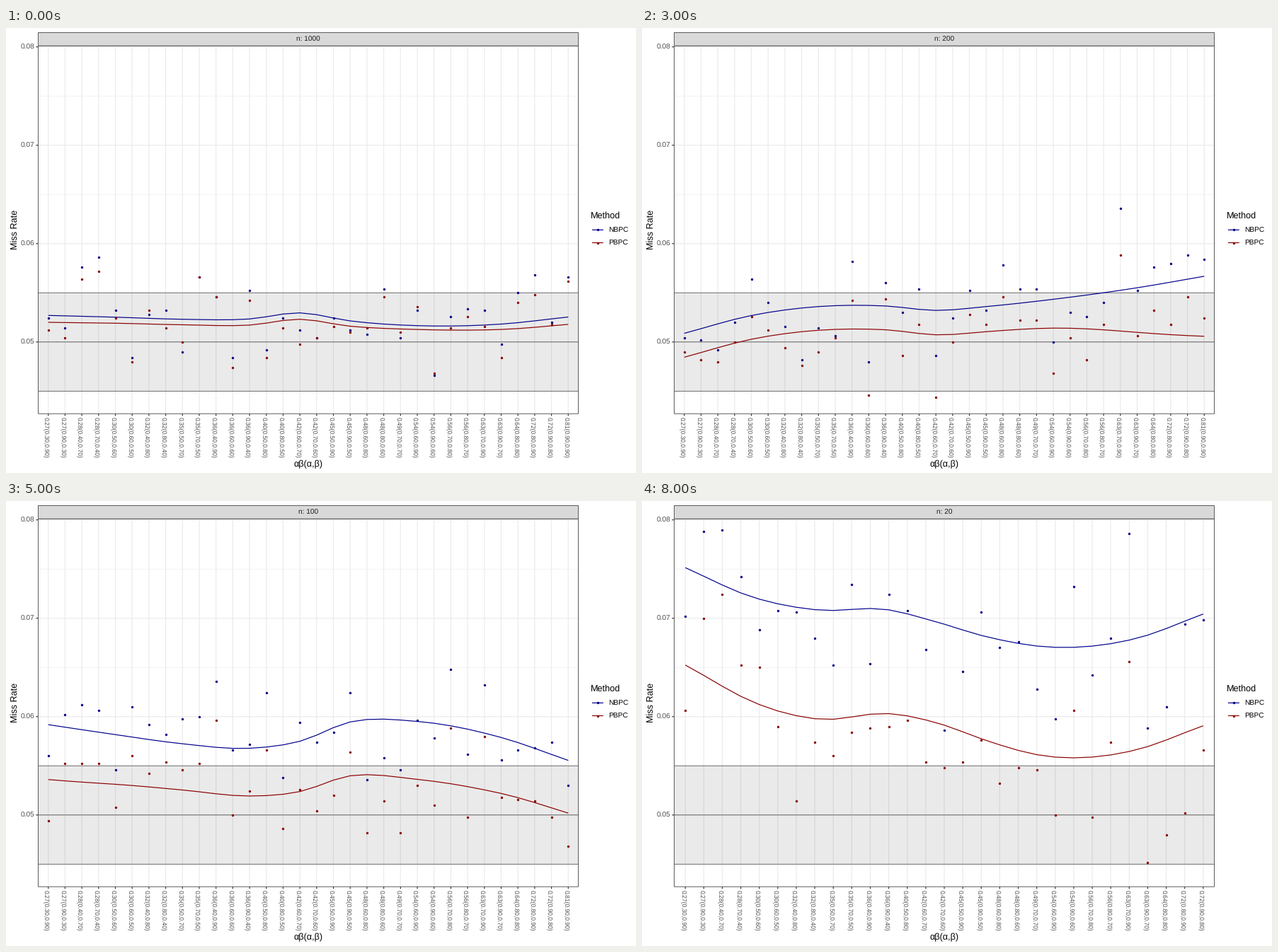
Animation, 890 px wide and 629 px high, one loop 9 s. Source, as a matplotlib script:

```python
from itertools import product

import numpy as np
import matplotlib.pyplot as plt
from matplotlib.animation import FuncAnimation
from matplotlib.patches import Rectangle

W, H, DPI = 890, 629, 100
PT = 72 / DPI
LEFT, RIGHT, TOP, BOTTOM = 45.5, 808.5, 25.2, 545.2
STRIP_TOP = 6.5
BASE, SMALL, TINY = 12.6, 10.08, 8.55
BLUE, RED = "#00008b", "#8b0000"
GRID, DARK, EDGE = "#ebebeb", "#333333", "#555555"

plt.rcParams.update({
    "font.family": ["Liberation Sans", "DejaVu Sans"],
    "path.snap": False,
    "text.hinting": "none",
})

# Effect pairs (alpha, beta) in tenths, ordered by their product
PAIRS = sorted(
    (p for p in product(range(3, 10), repeat=2) if p[0] * p[1] >= 27),
    key=lambda p: (p[0] * p[1], p[0]),
)
SMALL_N_GAPS = {(6, 6), (8, 5), (9, 9)}
SIZES = [1000, 500, 250, 200, 150, 100, 75, 50, 20]

# Category positions of the curve and gap key points
CURVE_AT = np.array([0, 4, 8, 12, 15, 18, 22, 27, 31]) / 31
GAP_AT = np.array([0, 8, 15, 22, 31]) / 31

# Per sample size: NBPC curve and its lead over PBPC, in 1/10000
trends = {}


def trend(n, curve, gap):
    trends[n] = np.array(curve), np.array(gap)


def between(n, a, b):
    trends[n] = tuple((u + v) / 2 for u, v in zip(trends[a], trends[b]))


trend(1000, [527, 525.2, 523.1, 523.4, 529.6, 521.4, 516.6, 518.2, 525.4],
      [7, 5.6, 6.5, 3.9, 7.5])
trend(250, [566.6, 546.8, 543.2, 554.9, 558.2, 552.6, 550.8, 559.9, 576.9],
      [27.5, 19.8, 28.1, 25.8, 28.3])
trend(200, [508.8, 526.9, 536, 536.6, 532.1, 536, 543.4, 555.1, 566.8],
      [24.3, 24.1, 24.8, 29.3, 61])
trend(100, [591.8, 581.7, 572.4, 567.8, 574.9, 594.6, 595.1, 578.8, 555.5],
      [55.8, 47, 51.1, 58.9, 53.6])
trend(50, [675.2, 629.9, 617.8, 635.6, 646.2, 636, 627.9, 628.5, 637.4],
      [99, 75.4, 82.1, 90.8, 106.8])
trend(20, [751.4, 721.6, 708.3, 709, 696.4, 681.3, 670.5, 679.5, 704.3],
      [99, 110.9, 102.5, 111.5, 113.6])
between(500, 1000, 250)
between(150, 200, 100)
between(75, 100, 50)


def smooth(x, kx, ky):
    """Cubic Hermite curve through the key points."""
    m = np.gradient(ky, kx)
    i = np.clip(np.searchsorted(kx, x, side="right") - 1, 0, len(kx) - 2)
    h = kx[i + 1] - kx[i]
    t = (x - kx[i]) / h
    return ((1 + 2 * t) * (1 - t) ** 2 * ky[i] + t * (1 - t) ** 2 * h * m[i]
            + t * t * (3 - 2 * t) * ky[i + 1] + t * t * (t - 1) * h * m[i + 1])


def series(n, size):
    """Curves of both methods and the dots scattered around them."""
    curve, gap = trends[n]
    t = np.linspace(0, 1, size)
    nbpc = smooth(t, CURVE_AT, curve)
    pbpc = nbpc - smooth(t, GAP_AT, gap)
    rng = np.random.default_rng(n)
    shared = rng.normal(0, 28 + 260 / n, size)

    def scatter(line):
        rates = line + shared + rng.normal(0, 5 + 300 / n, size)
        return np.clip(2 * np.rint(rates / 2), 444, 790)

    return (nbpc, scatter(nbpc), BLUE), (pbpc, scatter(pbpc), RED)


def ypix(rate):
    return 443.8 - 1.3905 * (rate - 500)


fig = plt.figure(figsize=(W / DPI, H / DPI), dpi=DPI, facecolor="white")
ax = fig.add_axes([0, 0, 1, 1])


def line(x, y, color, width, z=2):
    ax.plot(x, y, color=color, lw=width * PT, solid_capstyle="butt",
            solid_joinstyle="round", zorder=z)


def dots(x, y, color, z=2):
    ax.plot(x, y, "o", color=color, ms=3.4 * PT, mew=0, zorder=z)


def label(x, y, text, size, color="black", ha="left", angle=0):
    ax.text(x, y, text, fontsize=size * PT, color=color, ha=ha, va="baseline",
            rotation=angle, rotation_mode="anchor")


def box(y0, y1, **style):
    ax.add_patch(Rectangle((LEFT, y0), RIGHT - LEFT, y1 - y0, **style))


def draw_panel(xs):
    for rate in (650, 750):
        line([LEFT, RIGHT], [ypix(rate)] * 2, GRID, 0.6)
    for rate in range(500, 801, 100):
        line([LEFT, RIGHT], [ypix(rate)] * 2, GRID, 1.2)
    for x in xs:
        line([x, x], [TOP, BOTTOM], GRID, 1.2)
    box(ypix(550), ypix(450), fc=DARK, alpha=0.1, lw=0, zorder=2.1)
    for rate in (450, 500, 550):
        line([LEFT, RIGHT], [ypix(rate)] * 2, EDGE, 0.85, 2.2)


def draw_axes(xs, pairs):
    for rate in range(500, 801, 100):
        y = ypix(rate)
        line([LEFT - 3.1, LEFT], [y, y], DARK, 1.2)
        label(40.7, y + 3.5, f"{rate / 1e4:.2f}", SMALL, "#4d4d4d", "right")
    for x, (a, b) in zip(xs, pairs):
        line([x, x], [BOTTOM, BOTTOM + 3.1], DARK, 1.2)
        label(x - 6.1, 550, f"{a * b / 100:.2f}({a / 10:.2f},{b / 10:.2f})",
              TINY, "#4d4d4d", angle=270)
    label((LEFT + RIGHT) / 2, 620.3, "αβ(α,β)", BASE, ha="center")
    label(15.6, 285, "Miss Rate", BASE, ha="center", angle=90)


def draw_legend():
    label(826, 268.8, "Method", BASE)
    for y, name, color in ((285.4, "NBPC", BLUE), (303.5, "PBPC", RED)):
        line([827.9, 843.8], [y, y], color, 1.2)
        dots([835.9], [y], color)
        label(850.8, y + 3.6, name, SMALL)


def update(i):
    n = SIZES[i]
    pairs = [p for p in PAIRS if n > 20 or p not in SMALL_N_GAPS]
    step = (RIGHT - LEFT) / (len(pairs) + 0.2)
    xs = LEFT + step * (0.6 + np.arange(len(pairs)))

    ax.clear()
    ax.set(xlim=(0, W), ylim=(H, 0))
    ax.axis("off")
    draw_panel(xs)
    for curve, points, color in series(n, len(pairs)):
        line(xs, ypix(curve), color, 1.2, 2.5)
        dots(xs, ypix(points), color, 2.6)
    box(TOP, BOTTOM, fc="none", ec=EDGE, lw=0.95 * PT, zorder=2.8)
    box(STRIP_TOP, TOP, fc="#d9d9d9", ec=EDGE, lw=0.95 * PT, zorder=2.8)
    label((LEFT + RIGHT) / 2, 19.2, f"n: {n}", SMALL, "#1a1a1a", "center")
    draw_axes(xs, pairs)
    draw_legend()
    return ax.get_children()


anim = FuncAnimation(fig, update, frames=len(SIZES), interval=1000,
                     init_func=lambda: [], repeat=True, blit=False)
plt.show()
```
